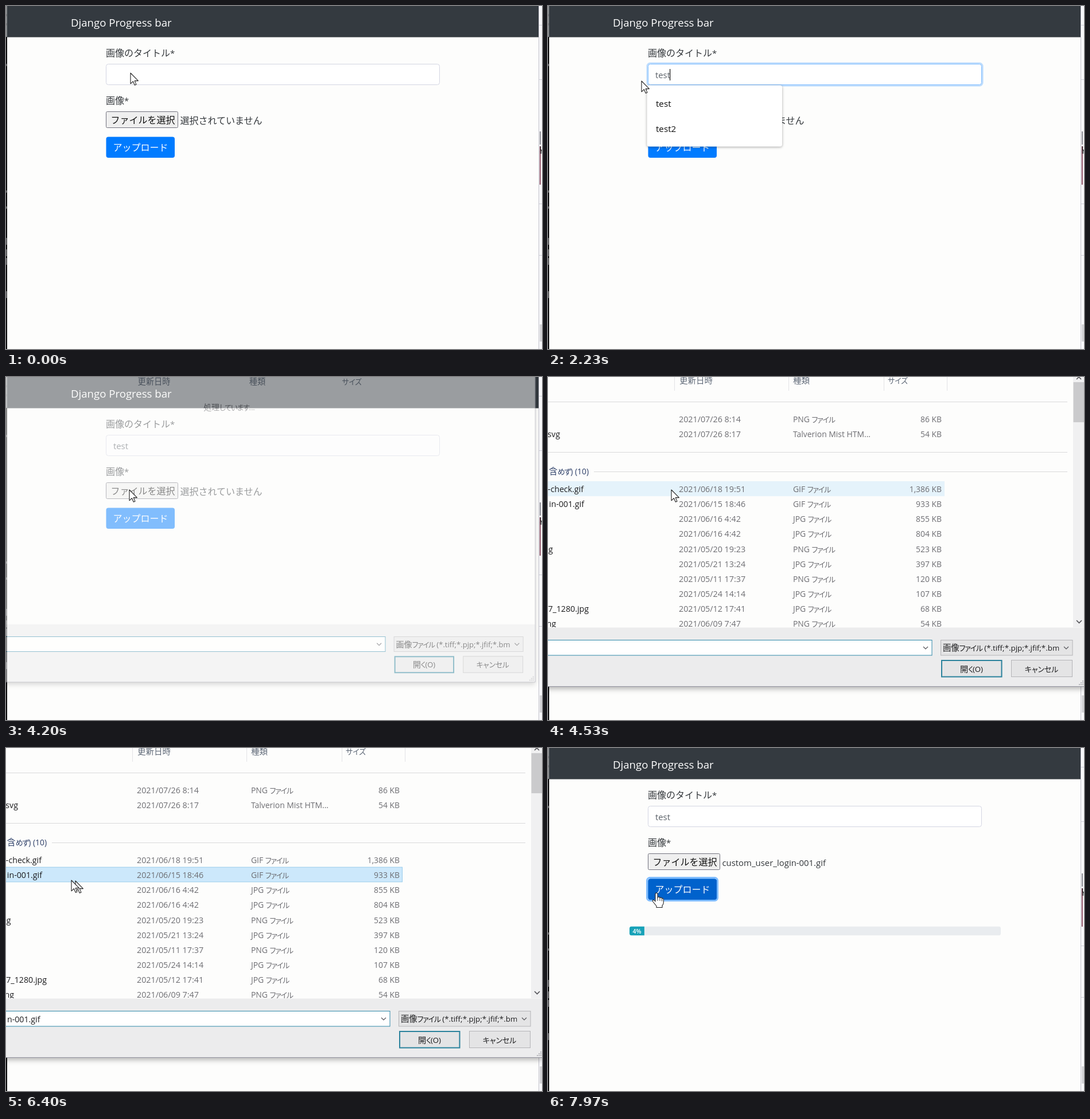
Animation, 934 px wide and 599 px high, one loop 8 s. Source, as an HTML page:

```html
<!DOCTYPE html>
<html lang="ja">
<head>
<meta charset="utf-8">
<title>Upload form</title>
<style>
html, body { margin: 0; width: 100%; height: 100%; overflow: hidden; background: #fdfdfc; }
svg { display: block; font-family: "Open Sans", "Noto Sans CJK JP", "Noto Sans CJK", sans-serif; }
.cjk { font-family: "Noto Sans CJK JP", "Noto Sans CJK", sans-serif; }
.dialog .kana { font-size: 13px; letter-spacing: -1.2px; font-feature-settings: "palt"; }
.dialog .wide .kana { letter-spacing: -.1px; }
.frame { filter: drop-shadow(0 4px 5px rgba(0, 0, 0, .3)); }
.popup { filter: drop-shadow(0 1px 2px rgba(0, 0, 0, .35)); }
</style>
</head>
<body>
<svg id="stage" width="934" height="599" viewBox="0 0 934 599"></svg>
<script>
const LOOP = 8000;
const stage = document.getElementById('stage');

function add(parent, tag, attrs = {}) {
  const el = document.createElementNS('http://www.w3.org/2000/svg', tag);
  for (const key in attrs) el.setAttribute(key, attrs[key]);
  parent.appendChild(el);
  return el;
}
const group = (parent, attrs) => add(parent, 'g', attrs);
const rect = (parent, x, y, width, height, fill, more) =>
  add(parent, 'rect', { x, y, width, height, fill, ...more });
const line = (parent, d, stroke, width = 1) =>
  add(parent, 'path', { d, stroke, fill: 'none', 'stroke-width': width });

// Latin and Japanese runs get their own optical size.
function text(parent, x, y, str, size, fill, more) {
  const el = add(parent, 'text', { x, y, fill, 'font-size': size, ...more });
  for (const run of str.match(/[\u3040-\u30ff]+|[\u4e00-\u9fff]+|[^\u3040-\u30ff\u4e00-\u9fff]+/g)) {
    const span = add(el, 'tspan');
    if (run >= '\u3040') {
      span.setAttribute('class', run < '\u4e00' ? 'cjk kana' : 'cjk');
      span.setAttribute('font-size', size * 1.074);
    }
    span.textContent = run;
  }
  return el;
}
const show = (el, on) => el.setAttribute('visibility', on ? 'inherit' : 'hidden');
const END = { 'text-anchor': 'end' };
const MID = { 'text-anchor': 'middle' };

// Page
const page = group(stage);
rect(page, 0, 0, 934, 599, '#fdfdfc');
rect(page, 2, 0, 927, 54.5, '#343a40');
text(page, 113, 36, 'Django Progress bar', 18.6, '#fff');
text(page, 174, 88, '画像のタイトル*', 14.9, '#33373b');
text(page, 174, 171, '画像*', 14.9, '#33373b');

const ring = rect(page, 173, 100, 584, 39, 'none',
  { rx: 5, stroke: '#007bff', 'stroke-opacity': .25, 'stroke-width': 3 });
const field = rect(page, 174.5, 101.5, 581, 36, '#fff', { rx: 4 });
const typed = text(page, 187, 125.5, 'test', 14.9, '#5a6067');
const caret = rect(page, 0, 110, 1.2, 20, '#111');

rect(page, 174.5, 184.5, 125, 28, '#efefef', { rx: 2, stroke: '#72727e' });
text(page, 182.5, 205, 'ファイルを選択', 14.9, '#111');
const noFile = text(page, 303.5, 205.5, '選択されていません', 14.9, '#33373b');
const fileName = text(page, 303.5, 205.5, 'custom_user_login-001.gif', 14.9, '#33373b');

const press = rect(page, 172.5, 226.5, 123, 40, 'none',
  { rx: 5, stroke: '#80bdff', 'stroke-width': 3 });
rect(page, 174.5, 228.5, 119.5, 36.5, '#007bff', { rx: 4 });
const shade = rect(page, 174.5, 228.5, 119.5, 36.5, '#0062cc', { rx: 4 });
text(page, 186.5, 252.5, 'アップロード', 14.9, '#fff');

const progress = group(page);
const clip = add(stage, 'clipPath', { id: 'pill' });
rect(clip, 142, 311.5, 647, 16, '#000', { rx: 4 });
const track = group(progress, { 'clip-path': 'url(#pill)' });
rect(track, 142, 311.5, 647, 16, '#e9ecef');
const bar = rect(track, 142, 311.5, 0, 16, '#17a2b8');
const percent = add(progress, 'text',
  { y: 323.5, fill: '#fff', 'font-size': 10.5, 'font-weight': 600, ...MID });

// Slivers of the windows behind the browser
rect(page, 0, 0, 2, 54, '#8a8d90');
rect(page, 0, 54, 2, 545, '#0c0c0e');
for (const y of [14, 30, 101, 322, 350, 405, 425, 440, 498])
  rect(page, 0, y, 1.5, y > 400 ? 12 : 4, '#77777a');
rect(page, 929, 0, 5, 599, '#f8f8fa');
line(page, 'M928.5 0V599', '#c3c3cc');
for (const y of [33.5, 128.5, 345.5, 435.5]) line(page, `M929 ${y}H934`, '#d0d0da');
rect(page, 930, 219, 2, 23, '#8b8b93');
rect(page, 930, 245, 1.5, 67, '#6d2038');
line(page, 'M931.5 245V258M931.5 252Q934 249 934 258', '#222', 1.2);
rect(page, 930, 556, 4, 30, '#d3d3d6');

const popup = group(page);
rect(popup, 172.5, 138.5, 235.5, 107, '#fff', { rx: 4, class: 'popup' });
text(popup, 188, 176, 'test', 15.2, '#111');
text(popup, 188, 220, 'test2', 15.2, '#111');

// File dialog
const ROW = 26.17, FIRST = 182;
const FILES = [
  ['2021/06/18 19:51', 'GIF', '1,386', '-check.gif', 62],
  ['2021/06/15 18:46', 'GIF', '933', 'in-001.gif', 63],
  ['2021/06/16 4:42', 'JPG', '855'],
  ['2021/06/16 4:42', 'JPG', '804'],
  ['2021/05/20 19:23', 'PNG', '523', 'g', 8.5],
  ['2021/05/21 13:24', 'JPG', '397'],
  ['2021/05/11 17:37', 'PNG', '120'],
  ['2021/05/24 14:14', 'JPG', '107'],
  ['2021/05/12 17:41', 'JPG', '68', '7_1280.jpg', 71],
  ['2021/06/09 7:47', 'PNG', '54', 'ng', 14]
];
const dialog = group(stage, { class: 'dialog' });
rect(dialog, -250, -250, 1185.5, 790.5, '#ececed', { class: 'frame' });
rect(dialog, -250, -250, 1185.5, 687.5, '#fdfdfc');
line(dialog, 'M-250 540.5H935.5V-250', '#9494a0');

const HEAD = '#5c6675';
text(dialog, 229, 10.5, '更新日時', 13.5, HEAD);
text(dialog, 427, 10.5, '種類', 13.5, HEAD);
text(dialog, 592, 10.5, 'サイズ', 13.5, HEAD, { class: 'wide' });
const busy = text(dialog, 391.6, 56, '処理しています...', 13.2, '#5f5f63', MID);

const listClip = add(stage, 'clipPath', { id: 'list' });
rect(listClip, -250, -250, 1185, 687, '#000');
const list = group(dialog, { 'clip-path': 'url(#list)' });
line(list, 'M220.5 0V24M419.5 0V24M585.5 0V24M695.5 0V24', '#e3e3e6');
line(list, 'M0 43.5H905M0 131.5H905M80 165.5H905', '#d9d9db');
const hover = rect(list, -20, 0, 711, ROW, '#e5f3fb');
const picked = rect(list, -20, FIRST + ROW, 710.5, ROW - .5, '#cce8fb', { stroke: '#99cdec' });

function fileRow(mid, [date, kind, size, name, end]) {
  const y = mid + 5, grey = '#6d6d72';
  if (name) text(list, end, y, name, 14.2, '#1c1c1e', END);
  text(list, 228, y, date, 14.3, grey);
  text(list, 427, y, kind.length > 3 ? kind : kind + ' ファイル', 13.9, grey);
  text(list, 686, y, size + ' KB', 13.9, grey, END);
}
fileRow(74, ['2021/07/26 8:14', 'PNG', '86']);
fileRow(100, ['2021/07/26 8:17', 'Talverion Mist HTM...', '54', 'svg', 21]);
text(list, 71, 169.5, '含めず) (10)', 13.9, '#2d3f68', END);
FILES.forEach((file, i) => fileRow(FIRST + ROW * (i + .53), file));

const scroll = group(list);
rect(scroll, 915, -20, 20, 458, '#f0f0f1');
rect(scroll, 915.5, 9, 19, 70, '#cacacc');
line(scroll, 'M921 4L925 0L929 4M921 425L925.5 429.5L930 425', '#55555a', 1.7);

rect(dialog, -50, 459.5, 719, 26.5, '#fff', { stroke: '#2f88a8' });
const chosen = text(dialog, 59.5, 479, 'n-001.gif', 14.2, '#1c1c1e', END);
rect(dialog, 684.5, 459.5, 229.5, 26.5, '#e4e4e5', { stroke: '#b4b4b7' });
line(dialog, 'M654 471L658 475L662 471M899 471L903 475L907 471', '#55555a', 1.2);
const filterClip = add(stage, 'clipPath', { id: 'types' });
rect(filterClip, 685, 458, 205.5, 30, '#000');
text(dialog, 688, 478, '画像ファイル (*.tiff;*.pjp;*.jfif;*.bmp)', 13.3, '#1c1c1e',
  { 'clip-path': 'url(#types)' });
rect(dialog, 686, 495, 104.5, 28.5, '#e4e4e5', { stroke: '#2b829c', 'stroke-width': 2 });
text(dialog, 738, 514.5, '開く(O)', 13.2, '#1c1c1e', MID);
rect(dialog, 807.5, 494.5, 106, 29, '#e4e4e5', { stroke: '#b4b4b7' });
text(dialog, 860, 514.5, 'キャンセル', 13.2, '#1c1c1e', { class: 'wide', ...MID });
for (let i = 0; i < 3; i++)
  for (let j = 0; j <= i; j++) rect(dialog, 931 - 3 * j, 530 + 3 * i, 2, 2, '#b5b5ba');

// Pointers
const ARROW = 'M0 0V18.8L4.4 14.7L7.3 21.3L10 20.1L7.2 13.6H13.4Z';
const OUTLINE = { fill: '#fff', stroke: '#222', 'stroke-width': 1.1, 'stroke-linejoin': 'round' };
const pointer = group(stage);
const ghost = add(pointer, 'path', { d: ARROW, transform: 'translate(7 1)', ...OUTLINE });
const arrow = add(pointer, 'path', { d: ARROW, ...OUTLINE });
const beam = line(pointer, 'M-3 0H-1Q0 0 0 1.5Q0 0 1 0H3M0 1.5V18M-3 19.5H-1Q0 19.5 0 18Q0 19.5 1 19.5H3', '#222', 1.2);
const hand = add(pointer, 'path', {
  d: 'M-2 1.5Q-2 -1 0 -1Q2 -1 2 1.5V8Q2 6 4 6Q6 6 6 8.5Q6 7 7.7 7Q9.5 7 9.5 9.5Q9.7 8.3 11 8.5Q12.3 8.8 12.3 11V16Q12.3 19 10 21V24.5H0V22L-6 14.5Q-7.5 12.5 -6 11.5Q-4.5 10.7 -2 14Z',
  ...OUTLINE
});
line(hand.parentNode.appendChild(group(pointer)), 'M2 8V13M6 9V13M9.5 10V13.5', '#222', .9);
const knuckles = pointer.lastChild;

// Pointer stops: time, x, y
const PATH = [
  [0, 217, 117], [30, 217, 117], [330, 207, 111], [1300, 207, 111], [1480, 163, 131],
  [3000, 163, 131], [3650, 215, 197], [5350, 215, 197], [5800, 121, 230], [6350, 121, 230],
  [6395, 114, 231], [6500, 114, 231], [6680, 187, 252], [7250, 187, 252], [7550, 189, 254],
  [LOOP, 189, 254]
];
const KEYS = [1520, 1660, 1800, 1950];
const clamp = v => Math.min(1, Math.max(0, v));
const ramp = (t, from, to) => clamp((t - from) / (to - from));
const between = (t, from, to) => t >= from && t < to;

function pointerAt(t) {
  const i = Math.max(1, PATH.findIndex(stop => stop[0] > t));
  const [t0, x0, y0] = PATH[i - 1], [t1, x1, y1] = PATH[i];
  const p = ramp(t, t0, t1), e = p * p * (3 - 2 * p);
  return [x0 + (x1 - x0) * e, y0 + (y1 - y0) * e];
}

function draw(t) {
  const [x, y] = pointerAt(t);
  pointer.setAttribute('transform', `translate(${x} ${y})`);
  const onField = between(t, 60, 1400), onButton = t >= 6620;
  show(beam, onField);
  show(hand, onButton);
  show(knuckles, onButton);
  show(arrow, !onField && !onButton);
  show(ghost, between(t, 6380, 6430));

  const focus = between(t, 500, 2750);
  field.setAttribute('stroke', focus ? '#80bdff' : '#d3d5e2');
  show(ring, focus);
  const letters = 'test'.slice(0, KEYS.filter(k => t >= k).length);
  typed.firstChild.textContent = letters;
  const since = t < KEYS[0] ? t - 500 : Math.max(0, t - KEYS[3]);
  show(caret, focus && Math.floor(since / 500) % 2 === 0);
  caret.setAttribute('x', 186 + (letters ? typed.getComputedTextLength() : 1));
  show(popup, between(t, KEYS[0] + 40, 2750));

  const open = ramp(t, 4140, 4260) * (1 - ramp(t, 6480, 6600));
  const k = .96 + .04 * open;
  dialog.setAttribute('opacity', open);
  dialog.setAttribute('transform', `translate(${260 * (1 - k)} ${155 * (1 - k)}) scale(${k})`);
  show(dialog, open > 0);
  const loaded = t >= 4480, selected = t >= 5950;
  show(list, loaded);
  show(busy, !loaded);
  const row = Math.floor((y - FIRST) / ROW);
  hover.setAttribute('y', FIRST + row * ROW);
  show(hover, row >= 0 && !selected);
  show(picked, selected);
  show(chosen, selected);
  show(noFile, t < 6480);
  show(fileName, t >= 6480);

  const down = t >= 7690;
  show(press, down);
  shade.setAttribute('opacity', down ? 1 : .75 * ramp(t, 6680, 6830));
  const done = Math.min(4, 1 + Math.floor((t - 7770) / 60));
  show(progress, t >= 7770);
  bar.setAttribute('width', 6.47 * Math.max(0, done));
  percent.setAttribute('x', 142 + Math.max(10, 3.235 * done));
  percent.textContent = done + '%';
}

const start = performance.now();
function tick() {
  draw((performance.now() - start) % LOOP);
  requestAnimationFrame(tick);
}
draw(0);
requestAnimationFrame(tick);
</script>
</body>
</html>
```
